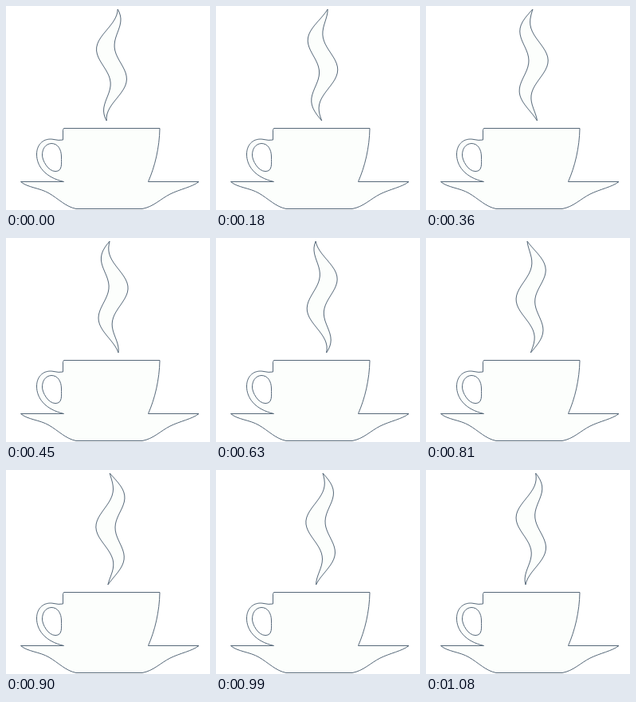
Animation, 256 px wide and 256 px high, one loop 1170 ms. Source, as an HTML page without scripts:

```html
<!DOCTYPE html>
<html lang="en">
<head>
<meta charset="utf-8">
<title>Steaming cup</title>
<style>
@property --t { syntax: "<number>"; inherits: true; initial-value: 0; }
:root { --ink: #566879; --fill: #fcfefc; }
html, body { margin: 0; width: 100%; height: 100%; overflow: hidden; background: #fff; }
svg { display: block; width: 100vw; height: 100vh; }
path { fill: var(--fill); stroke: var(--ink); stroke-linejoin: round; }
.hole { fill: #fff; }

/* A tapered band of thin rows; a sine wave climbs through it in 13 poses. */
.steam { position: absolute; left: 133.3px; top: 4px; animation: rise 1170ms steps(13) infinite; }
@keyframes rise { to { --t: 13; } }
.puff { --g: 0; }
.puff:nth-child(2) { --g: 1; }
.puff:nth-child(3) { --g: 2; }
.puff:nth-child(4) { --g: 3; }
.puff:nth-child(5) { --g: 4; }
i { --n: 0; }
i:nth-child(2) { --n: 1; }
i:nth-child(3) { --n: 2; }
i:nth-child(4) { --n: 3; }
i:nth-child(5) { --n: 4; }
i:nth-child(6) { --n: 5; }
i:nth-child(7) { --n: 6; }
i {
  --u: calc((7 * var(--g) + var(--n) + .5) / 35);
  --a: calc(360deg * (var(--u) * 5 / 3 + var(--t) / 13 - 1.076));
  --b: calc(180deg * var(--u));
  --w: calc(12px * sin(var(--b)) + .8px * sin(2 * var(--b)));
  --lean: calc(-.598 * sin(var(--a)));
  --flare: calc(.269 * cos(var(--b)) + .036 * cos(2 * var(--b)));
  display: block;
  position: relative;
  width: 28px;
  height: 4px;
  margin-left: -14px;
  background: linear-gradient(var(--fill), var(--fill)) center / calc(2 * var(--w)) 100% no-repeat;
  transform: translateX(calc(8px * cos(var(--a))));
}
i::before, i::after {
  content: "";
  position: absolute;
  left: 14px;
  width: 1px;
  height: 100%;
  background: var(--ink);
  transform: translateX(calc(var(--side) * var(--w) - .5px))
    skewX(atan(calc(var(--lean) + var(--side) * var(--flare))));
}
i::before { --side: -1; }
i::after { --side: 1; }
</style>
</head>
<body>
<svg viewBox="0 0 256 256">
  <path d="M18.5 220.5H72.5C49 215 38.5 201 38.5 186C38.5 173 48 165 60 167.5Q66 169 71.5 168V155.5L72.5 153.5H193C192.5 178 187 201 178.5 220.5H242C234 227 218 230 206 236S185 252 171 254.5H88C75 252 66 242 54 235S27 228 18.5 220.5Z"/>
  <path class="hole" d="M57 172.5C49 173 45.5 180 45.5 187S53 207.5 62 207.5S69.5 198 69.5 189S65 172.5 57 172.5Z"/>
</svg>
<div class="steam">
  <div class="puff"><i></i><i></i><i></i><i></i><i></i><i></i><i></i></div>
  <div class="puff"><i></i><i></i><i></i><i></i><i></i><i></i><i></i></div>
  <div class="puff"><i></i><i></i><i></i><i></i><i></i><i></i><i></i></div>
  <div class="puff"><i></i><i></i><i></i><i></i><i></i><i></i><i></i></div>
  <div class="puff"><i></i><i></i><i></i><i></i><i></i><i></i><i></i></div>
</div>
</body>
</html>
```
